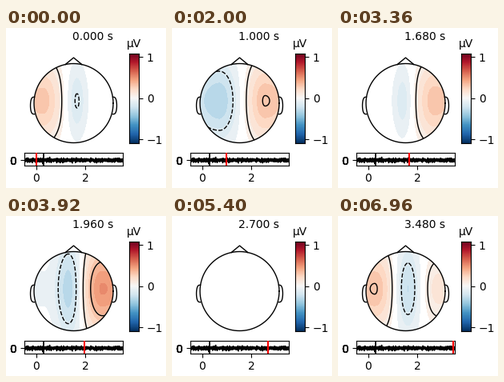
A matplotlib script that plays this animation: 200x200 px, repeating every 7 s.

```python
import matplotlib.pyplot as plt
import numpy as np
from matplotlib.animation import FuncAnimation
from matplotlib.patches import Circle

SIZE, DPI = 200, 100
FRAMES, INTERVAL, STEP = 175, 40, 0.02
VMAX = 1.09
CX, CY, R = 84.5, 94, 49.5

# Strength in uV of the left, centre and right sources at a few times in s
POSES = {
    0.00: (.30, -.195, 0),
    0.58: (.54, -.38, 0),
    1.00: (-.34, 0, .327),
    1.38: (0, 0, .094),
    1.96: (-.055, -.34, .50),
    2.70: (0, 0, 0),
    3.48: (.327, -.28, .14),
}
TIMES = np.array(list(POSES))
AMPS = np.array(list(POSES.values()))

LINES = np.arange(-.68, .9, .25)
EDGES = np.arange(.04, 1, .075)
BANDS = np.concatenate([-EDGES[::-1], EDGES])

plt.rcParams.update({"font.family": "DejaVu Sans", "font.size": 10})
cmap = plt.get_cmap("RdBu_r")
mids = np.concatenate([[-1], (BANDS[1:] + BANDS[:-1]) / 2, [1]])
fills = [cmap((m / VMAX + 1) / 2) if abs(m) > .01 else "white" for m in mids]

fig = plt.figure(figsize=(SIZE / DPI, SIZE / DPI), dpi=DPI, facecolor="white")


def axes_px(left, top, right, bottom):
    return fig.add_axes([left / SIZE, 1 - bottom / SIZE,
                         (right - left) / SIZE, (bottom - top) / SIZE])


def draw_head(ax):
    style = dict(color="k", lw=1, zorder=5)
    a = np.linspace(0, 2 * np.pi, 101)
    ax.plot(CX + R * np.cos(a), CY + R * np.sin(a), **style)
    dx, dy = np.sin(np.radians(12)), np.cos(np.radians(12))
    ax.plot(CX + R * np.array([-dx, 0, dx]), CY - R * np.array([dy, 1.15, dy]), **style)
    b = np.linspace(-np.pi / 2, np.pi / 2, 25)
    ear = R * (.99 + .1 * np.abs(np.cos(b)) ** .6)
    for side in (-1, 1):
        ax.plot(CX + side * ear, CY + R * (.06 + .216 * np.sin(b)), **style)


def draw_colorbar():
    ax = axes_px(154, 31.85, 166, 143.85)
    ax.imshow(np.linspace(-1, 1, 256)[:, None], cmap=cmap, origin="lower",
              aspect="auto", extent=(0, 1, -VMAX, VMAX))
    ax.set_xticks([])
    ax.set_yticks([-1, 0, 1])
    ax.yaxis.tick_right()
    ax.set_title("µV", fontsize=10)


def draw_trace():
    ax = axes_px(22.9, 155.7, 145.9, 171.7)
    rng = np.random.default_rng(4)
    t = np.arange(-.49, 3.54, .008)
    for _ in range(3):
        ax.plot(t, rng.normal(0, 1.15, t.size), "k", lw=1)
    ax.axvline(.31, color="k", lw=1.3)
    ax.set(xlim=(-.49, 3.54), ylim=(-6.5, 9.5), xticks=[0, 2], yticks=[0])
    # Stacked labels give the heavy zero on the left
    for _ in range(4):
        ax.annotate("0", (0, 0), xytext=(-7, 0), xycoords=("axes fraction", "data"),
                    textcoords="offset points", ha="right", va="center_baseline")
    return ax.axvline(0, color="r", lw=1.5, zorder=4)


stage = axes_px(0, 0, SIZE, SIZE)
stage.set(xlim=(0, SIZE), ylim=(SIZE, 0))
stage.axis("off")
draw_head(stage)
draw_colorbar()
cursor = draw_trace()
label = stage.text(83, 15, "", ha="left", va="baseline")
scalp = Circle((CX, CY), R, transform=stage.transData)
X, Y = np.meshgrid(np.linspace(CX - R - 1, CX + R + 1, 110),
                   np.linspace(CY - R - 1, CY + R + 1, 110))
maps = []


def strengths(t):
    k = min(np.searchsorted(TIMES, t + 1e-6) - 1, len(TIMES) - 2)
    u = (t - TIMES[k]) / (TIMES[k + 1] - TIMES[k])
    u = u * u * (3 - 2 * u)
    return AMPS[k] * (1 - u) + AMPS[k + 1] * u


def bump(amp, x, width, ratio, flank=0):
    """Gaussian hill; flank -1 or 1 stretches its left or right side."""
    dx = X - x
    w = width * np.where(dx * flank > 0, 1.8, 1)
    return amp * np.exp(-(dx / w) ** 2 - ((Y - 91) / (ratio * width)) ** 2)


def field(t):
    # Stronger sources spread wider, and neighbours push each other sideways
    left, mid, right = strengths(t)
    x_left = 46 if left > 0 else 34 - 75 * left
    return (bump(left, x_left, 18 + 12 * abs(left), 2.1, -1)
            + bump(mid, 85 + 11 * (left - right), 6 + 32 * abs(mid), 3.4)
            + bump(right, 121 + 14 * left, 18 + 12 * abs(right), 2.1, 1))


def update(i):
    while maps:
        maps.pop().remove()
    t = i * STEP
    z = field(t)
    maps.append(stage.contourf(X, Y, z, BANDS, colors=fills, extend="both", zorder=1))
    levels = [v for v in LINES if z.min() < v < z.max()]
    if levels:
        maps.append(stage.contour(X, Y, z, levels, colors="k", linewidths=1, zorder=2))
    for m in maps:
        m.set_clip_path(scalp)
    cursor.set_xdata([t, t])
    label.set_text(f"{t:.3f} s")
    return [label, cursor, *maps]


anim = FuncAnimation(fig, update, frames=FRAMES, interval=INTERVAL,
                     init_func=lambda: [], repeat=True, repeat_delay=0, blit=False)
plt.show()
```
